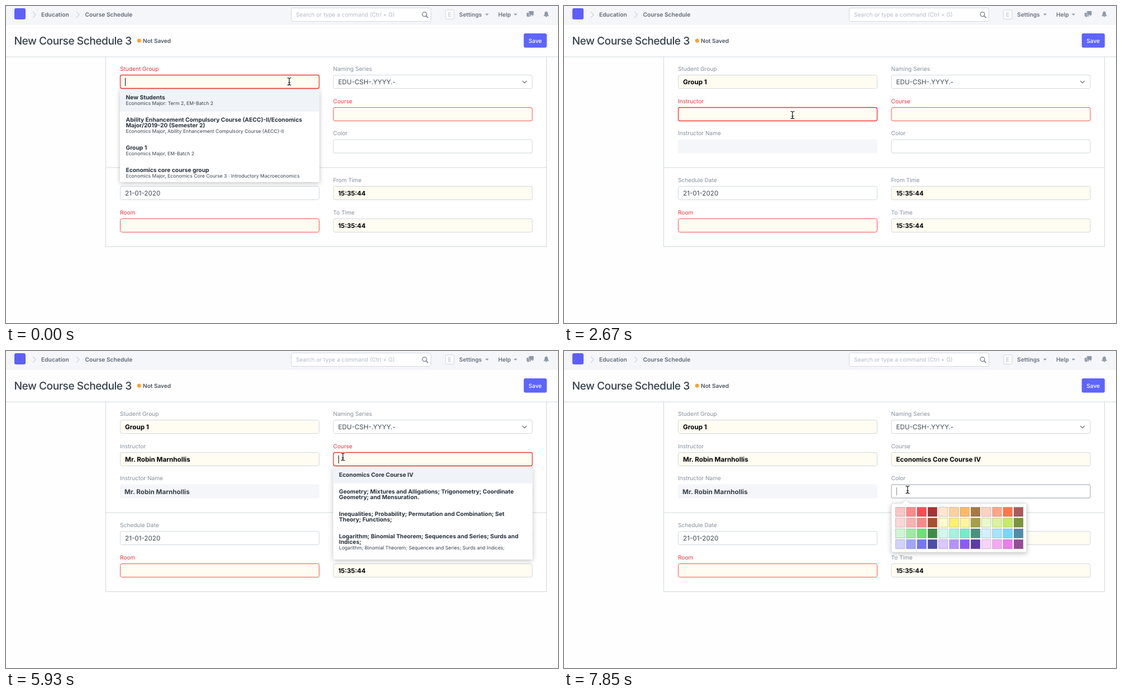
Recreate the animation shown at these times as an HTML page. Size 988 by 567 pixels, loop 8 s.

```html
<!DOCTYPE html>
<html lang="en">
<head>
<meta charset="utf-8">
<title>Course schedule form</title>
<style>
html, body { margin: 0; width: 100%; height: 100%; overflow: hidden; background: #fefefe; }
svg { display: block; position: absolute; left: 0; top: 0; }
text { font-family: Inter, "Open Sans", sans-serif; font-optical-sizing: none; text-rendering: geometricPrecision; white-space: pre; }
.title { letter-spacing: -.5px; }
.pop { filter: drop-shadow(0 2px 4px rgba(0,0,0,.24)); }
</style>
</head>
<body>
<svg width="988" height="567" viewBox="0 0 988 567">
  <g id="page"></g>
  <g id="live"></g>
</svg>
<script>
const LOOP = 8000;
const INK = '#36414c', MUTED = '#8d99a6', LABEL = '#85909c', LINE = '#d1d8dd', RED = '#f0544f', CREAM = '#fffcf2';
const PERSON = 'Mr. Robin Marnhollis', COURSE = 'Economics Core Course IV';
const LEFT = 204, RIGHT = 585.5, WIDE = 357;
const BODY = 10.15, VALUE = 11.7;

const text = (s, x, y, size = BODY, color = INK, weight = 400) =>
  `<text x="${x}" y="${y}" font-size="${size}" fill="${color}" font-weight="${weight}">${s}</text>`;
const rect = (x, y, w, h, fill, stroke = 'none', r = 0, sw = 1) =>
  `<rect x="${x}" y="${y}" width="${w}" height="${h}" rx="${r}" fill="${fill}" stroke="${stroke}" stroke-width="${sw}"/>`;
const path = (d, stroke, sw = 1, fill = 'none') =>
  `<path d="${d}" stroke="${stroke}" stroke-width="${sw}" fill="${fill}" stroke-linejoin="round" stroke-linecap="round"/>`;
const within = (t, a, b) => t >= a && t < b;

const pen = document.createElement('canvas').getContext('2d');
function endOf(s) {
  pen.font = `700 ${VALUE}px Inter, "Open Sans", sans-serif`;
  return pen.measureText(s).width;
}

// Label plus input; y is the top edge of the input.
function field(label, x, y, o = {}) {
  const red = o.red, focus = o.focus;
  const edge = red ? (focus ? '#ee3a33' : RED) : (focus ? '#b5bdc5' : LINE);
  let out = text(label, x, y - 7.3, BODY, red ? '#e6373c' : LABEL);
  out += o.locked
    ? rect(x, y, WIDE, 25, '#f5f6fa', 'none', 3)
    : rect(x + .5, y + .5, WIDE - 1, 24, o.fill || '#fff', edge, 3, focus ? 1.35 : 1);
  if (o.value) out += text(o.value, x + (o.dx || 9), y + 17, o.size || VALUE, o.color || '#000', o.weight || 700);
  return out;
}

function drawPage() {
  let s = rect(0, 0, 988, 33, '#f5f6fa') + rect(0, 32.5, 988, .8, '#eaedf1');
  s += rect(15, 4, 20, 20, '#5e5ff6', 'none', 3);
  s += path('M48.5 10.5l4.5 5l-4.5 5M126.5 10.5l4.5 5l-4.5 5', '#b4bec8');
  s += text('Education', 63, 19, 10.25, '#5d6874', 600) + text('Course Schedule', 141.5, 19, 10.25, '#5d6874', 600);
  s += rect(510.5, 3.5, 250, 24, '#fff', LINE, 3);
  s += text('Search or type a command (Ctrl + G)', 519, 19.2, BODY, '#b3bcc5');
  s += `<circle cx="749" cy="14.8" r="3.9" fill="none" stroke="#6c7680" stroke-width="1.2"/>` + path('M752 17.8l3 3', '#6c7680', 1.6);
  s += rect(786.5, 7, 15.5, 16.5, '#fafbfc', LINE, 2) + text('E', 791, 19, 10.5, '#bcc5ce');
  s += text('Settings', 811, 18.6, 10.2, '#66717d', 600) + text('Help', 881, 18.6, 10.2, '#66717d', 600);
  for (const x of [861, 912]) s += path(`M${x - 2.5} 14h5l-2.5 2.6z`, MUTED, .6, MUTED);
  // Chat and bell icons
  s += path('M936.5 9.5h7.5v6h-1v2l-2-2h-4.5z', MUTED, .8, MUTED);
  s += path('M932.5 12.5h2.5v4.5h4.5v1h-3.5l-2 2v-2h-1.5z', MUTED, .8, MUTED);
  s += path('M962.8 17.5q1.6-1.3 1.6-4.2q0-3 2.6-3.3q2.6.3 2.6 3.3q0 2.9 1.6 4.2z', MUTED, .8, MUTED);
  s += `<circle cx="967" cy="18.6" r="1.2" fill="${MUTED}"/>`;

  s += `<g class="title">${text('New Course Schedule 3', 14.5, 68.5, 19.2, INK, 550)}</g>`;
  s += `<circle cx="238.2" cy="62" r="3.5" fill="#ff9f2e"/>` + text('Not Saved', 245, 65.6, 10.1, '#4a5560', 600);
  s += rect(926.7, 49, 41.2, 25.5, '#5e64ff', 'none', 3) + text('Save', 935.3, 65.6, BODY, '#fff', 500);

  s += rect(178, 91, 790, 340, '#fff');
  s += path('M0 91H988M178.5 91V430.5H967.5V91M178.5 289H967.5', LINE);
  s += field('Naming Series', RIGHT, 123, { value: 'EDU-CSH-.YYYY.-', color: '#3f4953', weight: 400 });
  s += path('M924.5 134.3l3.5 3.5l3.5-3.5', '#7d8790', 1.5);
  s += field('Schedule Date', LEFT, 322, { value: '21-01-2020', color: '#3f4953', weight: 400 });
  s += field('Room', LEFT, 380, { red: true, fill: CREAM });
  const clock = { value: '15:35:44', size: 11.3, fill: CREAM };
  s += field('From Time', RIGHT, 322, clock) + field('To Time', RIGHT, 380, clock);
  return s;
}

// Rows: [height, bold lines, small line]
const GROUPS = [
  [40, ['New Students'], 'Economics Major: Term 2, EM-Batch 2'],
  [50, ['Ability Enhancement Compulsory Course (AECC)-II/Economics', 'Major/2019-20 (Semester 2)'],
    'Economics Major, Ability Enhancement Compulsory Course (AECC)-II'],
  [40, ['Group 1'], 'Economics Major, EM-Batch 2'],
  [36, ['Economics core course group'], 'Economics Major, Economics Core Course 3 : Introductory Macroeconomics']
];
const TEACHERS = [PERSON, 'Ms. Clara Ovenstrand', 'Create a new Instructor', 'Advanced Search'].map(n => [30, [n]]);
const COURSES = [
  [30, [COURSE]],
  [40, ['Geometry; Mixtures and Alligations; Trigonometry; Coordinate', 'Geometry; and Mensuration.']],
  [40, ['Inequalities; Probability; Permutation and Combination; Set', 'Theory; Functions;']],
  [50, ['Logarithm; Binomial Theorem; Sequences and Series; Surds and', 'Indices;'],
    'Logarithm; Binomial Theorem; Sequences and Series; Surds and Indices;']
];

function dropdown(x, y, h, rows, active) {
  let s = `<g class="pop">${rect(x, y, WIDE, h, '#fff', 'none', 2)}</g>`;
  let top = y;
  rows.forEach(([rowH, lines, small], i) => {
    if (i === active) s += rect(x, top, WIDE, rowH, '#f0f3f7');
    lines.forEach((line, k) => s += text(line, x + 10.5, top + 18 + 10 * k, 10.25, '#27313b', 700));
    if (small) s += text(small, x + 10.5, top + 18.4 + 10 * lines.length, 8.63, INK);
    top += rowH;
  });
  return s;
}

const SWATCHES = [
  'ffc4c4 ff8989 ff4d4d a83333 ffe8cd ffd19c ffb868 a87945 ffd2c2 ffa685 ff7846 a85b5b',
  'ffd7d7 ffb1b1 ff8989 a84f2e fffacd fff168 fff69c a89f45 ebf8cc d9f399 c5ec63 7b933d',
  'cef6d1 9deca2 6be273 428b46 d2f8ed a4f3dd 77ecca 49937e d2f1ff a6e4ff 78d6ff 4f8ea8',
  'd2d2ff a3a3ff 7575ff 4d4da8 dac7ff b592ff 8e58ff 5e3aa8 f8d4f8 f3aaf0 ec7dea 934f92'
];

function palette() {
  let s = `<g class="pop">${path('M589 272.5H605.5L612 266.5L618.5 272.5H825Q828 272.5 828 275.5V357Q828 360 825 360H589Q586 360 586 357V275.5Q586 272.5 589 272.5z', '#d5d8db', .8, '#fff')}</g>`;
  SWATCHES.forEach((row, j) => row.split(' ').forEach((c, i) => {
    s += rect(593.5 + 19.25 * i, 279.5 + 19.25 * j, 16.5, 16.5, '#' + c, 'rgba(0,0,0,.2)');
  }));
  return s;
}

const BEAM = 'M-3-6.5q3 0 3 2v9q0 2-3 2M3-6.5q-3 0-3 2M3 6.5q-3 0-3-2M-1.5 2h3';
const POINTERS = {
  beam: path(BEAM, '#fff', 2.6) + path(BEAM, '#000', 1.1),
  arrow: path('M-.5-6.5v11.8l2.7-2.5l1.9 4.3l2-.9l-1.9-4.2h3.7z', '#fff', 1, '#000'),
  hand: path('M-4-6.2c0-1.4 2-1.4 2 0v3.6c.3-1 1.9-1 2 .2c.5-.9 1.9-.7 2 .4c.6-.8 2-.5 2 .6v3c0 3-1 5-3.4 5h-2.2c-1.6 0-2.4-1-3.2-2.4l-2-3.3c-.6-1.2.8-2 1.6-1.1l1.2 1.4z', '#000', .9, '#fff') +
        path('M-1.2 1.5v2.5M.6 1.5v2.5M2.3 1.5v2.5', '#000', .6)
};

// Pointer path: [time, x, y, shape], held until the next entry
const MOVES = [
  [0, 507, 135, 'beam'], [450, 500, 154, 'hand'], [600, 478, 190, 'hand'], [750, 448, 230, 'hand'],
  [890, 427, 255, 'hand'], [1040, 419, 262, 'hand'], [1190, 418, 262, 'arrow'],
  [1480, 416, 242, 'arrow'], [1630, 412, 212, 'arrow'], [1780, 409, 198, 'beam'], [1930, 409, 195, 'beam'],
  [3710, 406, 212, 'hand'], [3860, 398, 230, 'hand'], [4160, 398, 231, 'arrow'],
  [4310, 440, 222, 'arrow'], [4440, 540, 202, 'arrow'], [4590, 601, 189, 'beam'], [5340, 603, 189, 'beam'],
  [6380, 605, 200, 'beam'], [6530, 609, 213, 'hand'], [6680, 613, 221, 'hand'], [6820, 615, 224, 'hand'],
  [7120, 615, 225, 'arrow'], [7270, 615, 233, 'arrow'], [7410, 615, 245, 'beam'], [7560, 615, 248, 'beam']
];

function carets() {
  const L = LEFT + 9.5, R = RIGHT + 10, after = 9.3;
  return [
    [0, 450, L, 135.5], [890, 1190, L, 135.5], [1190, 1780, LEFT + after + endOf('Group 1'), 135.5],
    [2230, 2670, L, 193.5], [3270, 3710, L, 193.5], [4160, 4440, LEFT + after + endOf(PERSON), 193.5],
    [4890, 5490, R, 193.5], [5930, 6380, R, 193.5], [6820, 7120, R, 193.5],
    [7120, 7410, RIGHT + after + endOf(COURSE), 193.5], [7850, LOOP, R, 251]
  ];
}

function scene(t) {
  const [, px, py, shape] = MOVES.filter(m => m[0] <= t).pop();
  let s = field('Student Group', LEFT, 123, {
    fill: CREAM, red: t < 1630, focus: t < 1930, value: t >= 1190 && 'Group 1' });
  s += field('Instructor', LEFT, 181, {
    fill: CREAM, red: t < 4440, focus: within(t, 2230, 4590), value: t >= 4160 && PERSON });
  s += field('Instructor Name', LEFT, 238.5, {
    locked: true, value: t >= 4440 && PERSON, dx: 8, color: INK });
  s += field('Course', RIGHT, 181, {
    fill: CREAM, red: t < 7410, focus: within(t, 5040, 7560), value: t >= 7120 && COURSE });
  s += field('Color', RIGHT, 238.5, { focus: t >= 7560 });

  if (t < 1190) s += dropdown(LEFT, 149, 166, GROUPS, py < 189 ? 0 : py < 239 ? 1 : 2);
  if (within(t, 3270, 4160)) s += dropdown(LEFT, 207, 123.5, TEACHERS, 0);
  if (within(t, 5930, 7120)) s += dropdown(RIGHT, 207, 166, COURSES, 0);
  if (t >= 7850) s += palette();

  for (const [from, to, x, y] of carets())
    if (within(t, from, to)) s += rect(x - .5, y - 7, 1, 14.5, t >= 7850 ? '#8a8a8a' : '#111');
  return s + `<g transform="translate(${px} ${py})">${POINTERS[shape]}</g>`;
}

const live = document.getElementById('live');
let shown = '';
function tick() {
  const next = scene(performance.now() % LOOP);
  if (next !== shown) live.innerHTML = shown = next;
  requestAnimationFrame(tick);
}
document.getElementById('page').innerHTML = drawPage();
tick();
</script>
</body>
</html>
```
